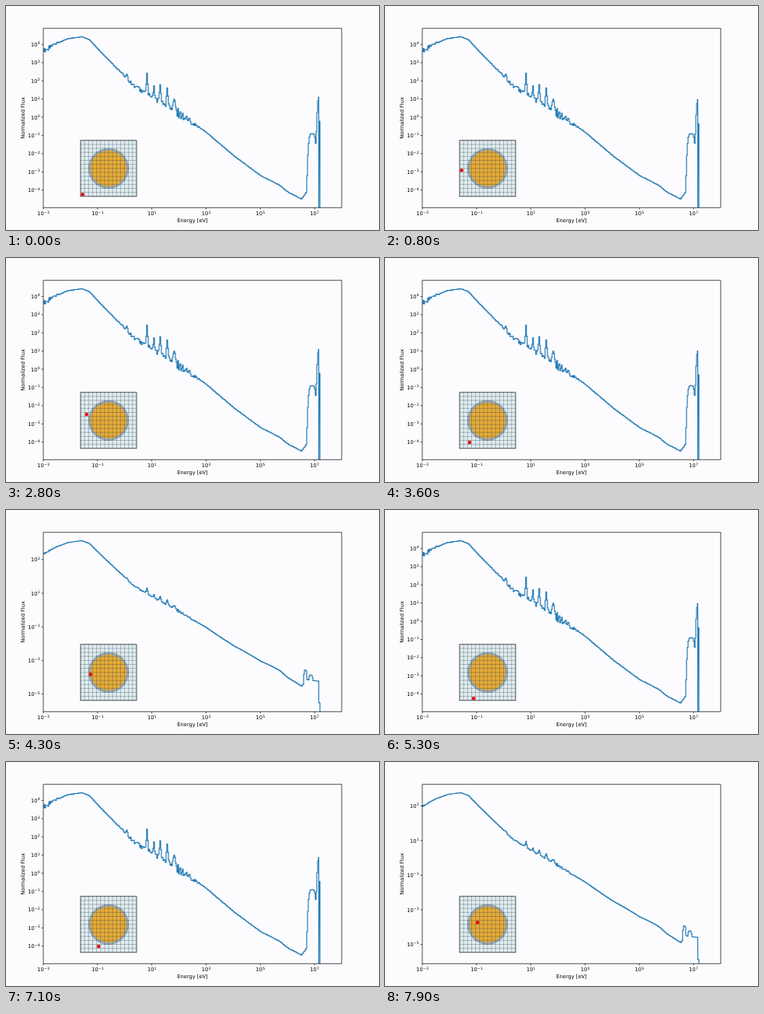
Animation of 480 by 288 pixels, one loop 8 s. Source, as an HTML page with a canvas:

```html
<!DOCTYPE html>
<html lang="en">
<head>
<meta charset="utf-8">
<title>Flux spectrum by cell</title>
<style>
  html, body { margin: 0; width: 100%; height: 100%; overflow: hidden; background: #fcfcfe; }
  canvas { display: block; }
</style>
</head>
<body>
<canvas id="stage" width="480" height="288"></canvas>
<script>
const ctx = document.getElementById('stage').getContext('2d');
const LOOP = 8000;
const BOX = { l: 48, t: 28.8, w: 384, h: 230.4 };
const BOTTOM = BOX.t + BOX.h;
const TOP = 39.4;                 // height of the curve's maximum
const END = 402;                  // last energy bin
const DECADE_X = BOX.w / 11;
const INSET = { x: 96, y: 172.8, size: 72, n: 14 };
const CELL = INSET.size / INSET.n;

// Key points of the spectrum: x and decades below the maximum
const KEYS = [
  [48, 0.78], [65, 0.36], [80, 0.11], [97, 0], [107, 0.17], [118, 0.68], [132, 1.3], [153, 2.2],
  [163, 2.65], [188, 3.37], [222, 4.2], [258, 5.28], [292, 6.52], [327, 7.63], [352, 8.17],
  [362, 8.53], [380, 8.93], [387, 8.5], [END, 8.5]
];
// Resonances: x and height in decades
const PEAKS = [[155, 0.25], [181, 1.1], [190, 0.6], [198, 1.1], [207, 1], [216, 0.65]];

const rand = n => { const v = Math.sin(n * 127.1) * 43758.5453; return v - Math.floor(v); };
const bell = (x, mid, width) => Math.exp(-(((x - mid) / width) ** 2));

function base(x) {
  const i = Math.max(1, KEYS.findIndex(k => k[0] >= x));
  const [x0, d0] = KEYS[i - 1], [x1, d1] = KEYS[i];
  return d0 + (d1 - d0) * (x - x0) / (x1 - x0);
}

function detail(x) {
  const peaks = PEAKS.reduce((sum, [p, h]) => sum + h * bell(x, p, 1.3), 0);
  const rough = 0.3 * bell(x, 48, 14) + 0.5 * bell(x, 222, 18) + 0.25 * bell(x, 180, 25) + 0.03;
  return peaks + rough * (rand(x) - 0.5);
}

// Decades below the maximum, with the fast neutron bumps at the right
const waterDrop = (x, dip) => Math.min(
  base(x) - detail(x),
  5.33 + 0.0013 * (x - 393.5) ** 4,
  3.32 + dip + 0.21 * (x - END) ** 2
);
const fuelDrop = x => Math.min(
  base(x) - 0.3 * detail(x) - 0.47 * bell(x, 335, 60),
  7.71 + 0.023 * (x - 384.8) ** 4,
  7.99 + 0.007 * (x - 391.8) ** 4,
  x < 399 ? 9 : 8.41
);

// Four steps of 100 ms, then a pause, every 500 ms
function cellIndex(t) {
  const u = t - 300, k = Math.floor(u / 500);
  return 2 + 4 * k + Math.min(3, Math.floor((u - 500 * k) / 100));
}

// peak: log10 of the maximum, step: pixels per decade, every: decades per label
function stateOf(index) {
  const col = Math.floor(index / INSET.n), row = index % INSET.n;
  const d = Math.hypot(col - 6.5, row - 6.5);
  const cell = { col, row, index };
  if (d > 5.08) return { ...cell, water: true, peak: 4.43, step: 23.4, every: 1 };
  if (d > 4.36) return { ...cell, peak: 4.13, step: 21.6, every: 2 };
  return { ...cell, peak: 3.77, step: 21.75 + 0.5 * (col - 3), every: 2 };
}

function line(x0, y0, x1, y1) {
  ctx.beginPath();
  ctx.moveTo(x0, y0);
  ctx.lineTo(x1, y1);
  ctx.stroke();
}

function disc(x, y, r, color) {
  ctx.fillStyle = color;
  ctx.beginPath();
  ctx.arc(x, y, r, 0, 7);
  ctx.fill();
}

const font = size => { ctx.font = size + 'px "DejaVu Sans", sans-serif'; };

// align: 0.5 centres the label on x, 1 ends it there
function power(exp, x, y, align) {
  const sup = String(exp).replace('-', '\u2212');
  font(4.67);
  const supW = ctx.measureText(sup).width;
  font(6.67);
  const baseW = ctx.measureText('10').width;
  const left = x - (baseW + supW) * align;
  ctx.fillText('10', left, y);
  font(4.67);
  ctx.fillText(sup, left + baseW + 0.2, y - 2.6);
}

function drawAxes(s) {
  ctx.fillStyle = ctx.strokeStyle = '#000';
  ctx.lineWidth = 0.7;
  ctx.textAlign = 'left';
  for (let e = -3; e <= 7; e += 2) {
    const x = BOX.l + (e + 3) * DECADE_X;
    line(x, BOTTOM, x, BOTTOM + 2.3);
    power(e, x, 269.3, 0.5);
  }
  for (let e = -5; e <= 4; e += s.every) {
    const y = TOP + (s.peak - e) * s.step;
    if (y > BOTTOM) continue;
    line(BOX.l - 2.3, y, BOX.l, y);
    power(e, 43.5, y + 2.5, 1);
  }
  ctx.strokeRect(BOX.l, BOX.t, BOX.w, BOX.h);
  font(6.67);
  ctx.textAlign = 'center';
  ctx.fillText('Energy [eV]', 240, 278);
  ctx.save();
  ctx.translate(23.7, 144);
  ctx.rotate(-Math.PI / 2);
  ctx.fillText('Normalized Flux', 0, 0);
  ctx.restore();
}

function drawCurve(s) {
  const dip = 0.28 * Math.sin(0.131 * s.index) ** 2;
  const toY = drop => TOP + drop * s.step;
  ctx.save();
  ctx.beginPath();
  ctx.rect(BOX.l, BOX.t, BOX.w, BOX.h);
  ctx.clip();
  ctx.beginPath();
  for (let x = BOX.l; x <= END; x++) {
    const y = toY(s.water ? waterDrop(x, dip) : fuelDrop(x));
    ctx.lineTo(x, y);
    ctx.lineTo(Math.min(x + 1, END + 0.5), y);
  }
  // The last bin is a spike in water, a low step elsewhere
  if (s.water) ctx.lineTo(END + 0.5, BOTTOM + 3);
  const last = toY(s.water ? 4.64 + dip : 9.65);
  ctx.lineTo(END + (s.water ? 1 : 0.5), last);
  ctx.lineTo(END + 2, last);
  ctx.lineTo(END + 2, BOTTOM + 3);
  ctx.strokeStyle = '#1f77b4';
  ctx.lineWidth = 1.15;
  ctx.stroke();
  ctx.restore();
}

function drawInset(s) {
  const { x, y, size, n } = INSET, mid = size / 2;
  ctx.fillStyle = '#e2edf0';
  ctx.fillRect(x, y, size, size);
  disc(x + mid, y + mid, 5.08 * CELL, '#9aa8b2');
  disc(x + mid, y + mid, 4.5 * CELL, '#e9ab36');
  ctx.strokeStyle = 'rgba(35, 70, 85, 0.55)';
  ctx.lineWidth = 0.6;
  for (let i = 1; i < n; i++) {
    line(x + i * CELL, y, x + i * CELL, y + size);
    line(x, y + i * CELL, x + size, y + i * CELL);
  }
  ctx.strokeStyle = '#222';
  ctx.lineWidth = 0.8;
  ctx.strokeRect(x, y, size, size);
  disc(x + (s.col + 0.5) * CELL, y + size - (s.row + 0.5) * CELL, 2.3, '#f00808');
}

function frame() {
  const s = stateOf(cellIndex(performance.now() % LOOP));
  ctx.fillStyle = '#fcfcfe';
  ctx.fillRect(0, 0, 480, 288);
  drawCurve(s);
  drawAxes(s);
  drawInset(s);
  requestAnimationFrame(frame);
}
frame();
</script>
</body>
</html>
```
